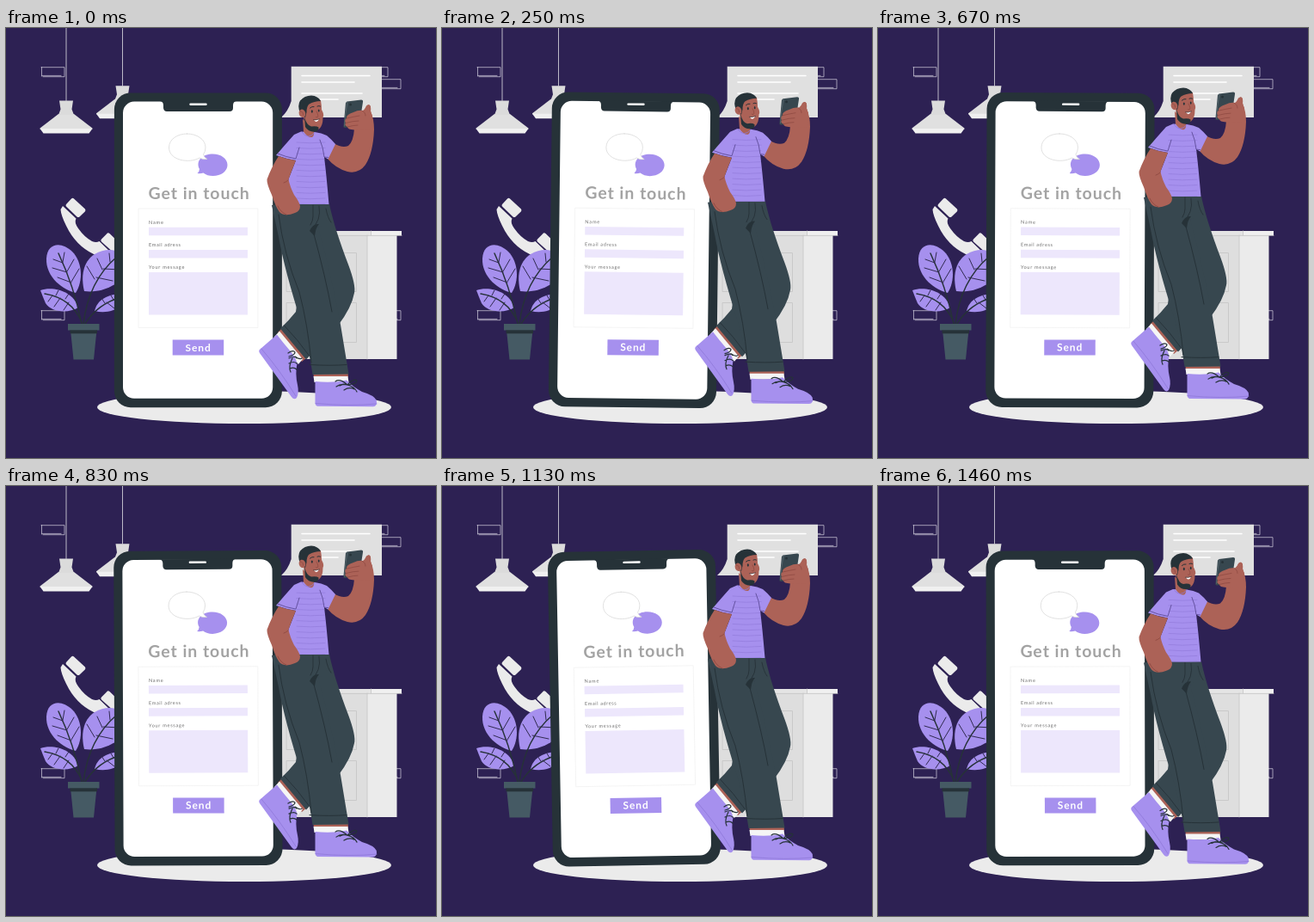
An HTML page with a canvas that plays this animation: 500x500 px, repeating every 1.5 s.

```html
<!DOCTYPE html>
<html lang="en">
<head>
<meta charset="utf-8">
<title>Get in touch</title>
<style>
  html, body { margin: 0; width: 100%; height: 100%; overflow: hidden; background: #2d2153; }
  canvas { display: block; width: 100vw; height: 100vh; }
</style>
</head>
<body>
<canvas></canvas>
<script>
const SIZE = 500, LOOP = 1500, STEPS = 36;
const BG = '#2d2153', PURPLE = '#a690ee', DARK = '#263238', CLOTH = '#37474f';
const SKIN = '#ac6257', SKIN_DARK = '#8c473f', PALE = '#ebebeb', GREY = '#e0e0e0';

const canvas = document.querySelector('canvas');
const ctx = canvas.getContext('2d');
const ratio = Math.max(1, window.devicePixelRatio || 1);
canvas.width = canvas.height = SIZE * ratio;

function fill(color, path) {
  ctx.fillStyle = color;
  ctx.fill(new Path2D(path));
}

function line(color, width, path) {
  ctx.strokeStyle = color;
  ctx.lineWidth = width;
  ctx.stroke(new Path2D(path));
}

function rect(color, x, y, w, h, radius = 0) {
  ctx.fillStyle = color;
  ctx.beginPath();
  ctx.roundRect(x, y, w, h, radius);
  ctx.fill();
}

function oval(color, x, y, rx, ry, angle = 0) {
  ctx.fillStyle = color;
  ctx.beginPath();
  ctx.ellipse(x, y, rx, ry, angle, 0, Math.PI * 2);
  ctx.fill();
}

function label(text, x, y, size, spacing, color, weight = 400) {
  ctx.font = `${weight} ${size}px Lato, sans-serif`;
  ctx.letterSpacing = spacing + 'px';
  ctx.fillStyle = color;
  ctx.fillText(text, x, y);
}

function brick(x, y, w) {
  line('#d5d1e0', 0.7, `M${x} ${y + 0.7}h${w}v11h${-w + 2}M${x + 0.5} ${y + 0.5}v10.500M${x + 1} ${y + 10.4}h${w - 5}`);
}

function lamp(x, y) {
  line('#bdbac8', 1, `M${x} 0V${y}`);
  fill(GREY, `M${x - 9} ${y + 15.5}h18l21.5 16.500v1h-61v-1z`);
  fill('#dbdbdb', `M${x - 8} ${y}h16l-1.500 10l2.500 6.500h-18l2.500 -6.500z`);
  fill('#f0f0f0', `M${x - 30.5} ${y + 32.5}h61l-4 5.500h-53z`);
}

function handset() {
  fill(PALE, 'M76 198.500Q77.500 197 79 198.500L92 210.500Q93 212 91.800 213.500L85.500 219.500Q84 220.500 82.500 219.500L70 207.500Q69 206 70 205z');
  fill(PALE, 'M117 239.500Q118.500 237.500 120.500 239L135 253L126 262L111 248.500Q109.500 247 111 245.500z');
  fill(PALE, 'M66 207L81.5 221.5Q79 226 84 233Q91 243 100 248Q105 250 108.5 248L124 263Q113 267 102 263Q81 253 70 230Q64 218 63.5 211Z');
}

function plant() {
  const leaves = [
    'M81 308C67 305 46 290 47 268C48 249 65 248 77 260C89 272 90 294 81 308z',
    'M91 306C87 290 89 272 103 263C120 253 139 258 140 277C139 296 113 309 91 306z',
    'M84 325C73 332 53 331 46 320Q43 313 40 305C55 300 78 306 84 325z',
    'M103 329C106 316 118 309 137 309C140 322 124 334 103 329z'
  ];
  leaves.forEach(leaf => fill(PURPLE, leaf));
  line(DARK, 1.5, 'M61 262Q79 300 88 344M129 266Q96 294 90 344M45 309Q76 314 88 342M134 313Q106 321 92 344');
  line('#302a50', 1, 'M66 273l-11 -4M71 284l-17 -5M76 296l-16 -6M66 272l2 -11M71 283l8 -14M76 295l9 -15'
    + 'M121 272l-1 -10M112 281l-6 -13M103 292l-9 -15M113 280l20 1M105 290l19 4'
    + 'M54 311l-5 7M63 314l-7 10M73 319l-6 9M58 311l3 -6M69 315l4 -6'
    + 'M125 316l-3 -5M115 320l-4 -6M117 319l9 7');
  rect('#455a64', 72, 344, 36.5, 7.5);
  fill('#455a64', 'M75 351h30.5l-3.5 34.5h-23.5z');
  rect(DARK, 74.5, 351.3, 31.5, 4);
}

function speechBoard() {
  fill(GREY, 'M331.700 44.700h105.300v59.300h-117Q328 97 331.700 85z');
  line('#fff', 1.6, 'M344 55.5h79M344 63h61M344 76h70M344 83h42');
}

function cabinet() {
  rect('#dedede', 316, 241, 104, 144);
  rect(PALE, 420, 241, 34.5, 144);
  rect('#e4e4e4', 310, 236, 114, 5);
  rect('#f0f0f0', 424, 236, 36, 5);
  line('#c4c4c4', 0.8, 'M312 241.4h148M424.5 236v5M420 241v144M326.500 261.5h81v45h-81zM326.500 319.5h81v46h-81z');
}

function backdrop() {
  ctx.fillStyle = BG;
  ctx.fillRect(0, 0, SIZE, SIZE);
  brick(41, 45, 27);
  brick(41, 328, 27);
  brick(412, 45, 32);
  brick(425, 59, 34);
  brick(430, 328, 29);
  lamp(70, 84.5);
  lamp(135.5, 67.2);
  speechBoard();
  cabinet();
  handset();
  plant();
  oval(PALE, 277, 441, 171, 19);
}

function bigPhone(angle) {
  ctx.save();
  ctx.translate(223.4, 258.3);
  ctx.rotate(angle * Math.PI / 180);
  ctx.translate(-223.4, -258.3);

  rect(DARK, 125.9, 75.4, 195, 365.8, 19);
  rect('#fff', 136, 85.6, 174.2, 345.2, 13);
  fill(DARK, 'M179 85Q183 85.500 183 90V93Q183.500 97 187 97H260Q264 97 264 93V90Q264 85.500 268 85z');
  line('#fff', 2.4, 'M214.5 88.7h18');

  fill(PURPLE, 'M240.5 146.500C250 146.500 257.500 152 257.500 159.200C257.500 166.500 250 172 240.500 172Q234 172 229.500 168.500Q226 169.500 222.500 169Q225 166.500 225 164C220 154 229 146.500 240.500 146.500z');
  const bubble = 'M210.5 123C222 123 232 129.500 232 139Q232 143.500 229.500 147Q230 150 234 152.500Q229 153.500 225 151C213 158 189.500 154 189.500 139C189.500 129.500 199 123 210.500 123z';
  fill('#fff', bubble);
  line('#d4d4d4', 0.7, bubble);

  label('Get in touch', 165.5, 199, 19.5, 0.95, '#a3a3a3', 700);
  line('#efefef', 0.7, 'M154.5 210h138.500v138.500h-138.500z');
  label('Name', 166, 227.8, 5.6, 0.8, '#6f6f6f');
  label('Email adress', 166, 254, 5.6, 0.6, '#6f6f6f');
  label('Your message', 166, 280.2, 5.6, 0.7, '#6f6f6f');
  rect('#ede7fc', 166, 231.7, 115, 9.5);
  rect('#ede7fc', 166, 258, 115, 9.5);
  rect('#ede7fc', 166, 284, 115, 49.5);
  rect(PURPLE, 193.7, 362.5, 59.5, 18);
  label('Send', 208.5, 375.5, 12, 0.9, '#fff', 700);
  ctx.restore();
}

function backLeg() {
  fill(SKIN, 'M321 349L350 383L344 388L316 354z');
  fill('#f5f5f5', 'M318 352.500L345 385L340 391L312 359z');
  fill(PURPLE, 'M315 356.500Q323 367 330 375Q337 383 338.500 390Q336 402 339 415Q341 424 338 430Q335 433 332 429L295 378Q293 375 296 373z');
  line('#8f78d8', 0.8, 'M297 373Q318 397 337 428');
  line(DARK, 1.2, 'M328 378q6 -4 8 -1q0 3 -7 5M329 384q7 -3 9 0M329 390q6 -3 9 0M330 396q5 -2 8 1M333 384q-5 10 -2 16M336 382q6 4 8 2');
  fill(CLOTH, 'M376 205C381 228 388 248 398 275Q407 299 405 308Q402 325 386 346L349 385.500L319 349.500Q329 340 337 330L345 270z');
  line(DARK, 0.9, 'M323.500 346Q339 362 352.500 381');
}

function frontLeg() {
  fill(SKIN, 'M357 400h40.500l.5 6h-40z');
  fill('#f5f5f5', 'M357.500 405h40l1 7h-40z');
  fill(PURPLE, 'M359.500 411Q380 413 396 409.500Q403 417 414 423Q428 427 430.800 433Q432 440 427 440.300L362 439.800Q359 439 359.500 433z');
  line('#8f78d8', 0.8, 'M360 436.500Q400 440 431 437');
  line(DARK, 1.2, 'M383 411q5 -4 14 4M388 416q7 -4 14 1M393 421q6 -4 12 -1M397 415q7 -8 11 -5q0 4 -11 5q-8 -2 -13 2M397 415q8 2 11 8');
  fill(CLOTH, 'M309 206Q340 202 376 205Q378 224 363 232L371 262Q383 312 389 345L398.500 402.500L356.500 403Q353 376 344 345Q324 282 317 243z');
  line(DARK, 1, 'M317 217Q323 263 341 307Q351 345 355 389M357 236Q372 291 379 330M353 391.500Q377 393 396 391.500');
  line(DARK, 0.9, 'M357 206V219Q357 224 354 229M364 207Q367 224 355 234M372 210Q374 221 378 226');
  fill(DARK, 'M353 236Q357 227 364 228Q360 232 359 242z');
}

function rightArm() {
  fill(SKIN, 'M381 134Q391 140 398 137Q404 132 405 117L400 110L416 97Q418 91 422 89Q425 91 424 97Q428 106 428 118Q427 145 418 159Q410 170 397 167Q383 163 373 151z');
  fill(CLOTH, 'M396.500 85.500L413 83.500Q415.500 83.500 415 86L411 112Q410 114 408 114.500L394 116Q392 116 392.500 113.500L395 87z');
  line('#607078', 0.7, 'M397 86Q394 100 393.500 114');
  oval(DARK, 400.5, 89, 1.5, 1.5);
  fill(SKIN, 'M404 98Q410 95 415 96Q418 94 419 90.500Q422 88 424 91Q423 96 426 102L424 119L405 118.500Q397 118 397 115Q393 113 395 110.500Q393 107 396 105Q395 101 404 98z');
  line(SKIN_DARK, 0.7, 'M396 105Q405 103 411 102M395 110.500Q404 108 410 108M397 115Q404 113 409 113M414 96Q418 98 418 102');
}

function torso() {
  const shirt = 'M343 120.500L359 121Q367 122 373 125Q379 130 383 135L374.500 152.500L370 150Q372.500 170 375.500 205H336.500Q330 188 328 177L337 154Q325 152 314 148Q326 134 335 124z';
  fill(PURPLE, shirt);
  ctx.save();
  ctx.clip(new Path2D(shirt));
  let stripes = '';
  for (let y = 133; y < 205; y += 6.5) stripes += `M338 ${y}Q353 ${y + 1.5} 371 ${y}`;
  line('#937cdc', 0.7, stripes);
  ctx.restore();
  line('#55438f', 0.8, 'M341 139L337 152Q325 150 316 146M365 130Q369 139 370 150L374.500 150.500');
  fill(SKIN, 'M317 149Q326 152.500 337 154Q332 166 328.500 176Q330 184 335 194Q341 202 342 207Q342 213 336 215Q324 220 318 214Q313 207 309 194Q303 181 303.500 176Q309 161 317 149z');
  line(SKIN_DARK, 0.8, 'M328 177Q326 179 323 180M316 207Q319 214 326 217');
}

function head() {
  fill(SKIN, 'M345 106L346 120.500Q351 128 356 127Q359 125 358 118z');
  line('#8f78d8', 0.8, 'M344 121Q351 131 359 121.500');
  fill(SKIN, 'M348 87Q359 81 366 84Q367 90 367 95Q370.500 101 368.500 104Q368.500 114 364 117.500Q355 122 348 114L345 98z');
  fill(DARK, 'M342 99Q338.500 90 342 84.500Q347 78.500 355 78.500Q363 79 366 85Q358 85 352.500 88.500Q349.500 91 349.500 98L348 104z');
  fill(DARK, 'M347 103Q349.500 113.500 355 114.500Q361 113.500 363.500 115.500Q364 119 360 120.500Q352 121.500 348 115z');
  oval(SKIN, 344.5, 99.3, 3.8, 4.8, -0.3);
  line(SKIN_DARK, 0.7, 'M342.500 97q3 0 3 4M361 97Q364 102 362 104L360.500 103.500');
  line(DARK, 1, 'M353.500 93q2 -2 4.500 -1.500M362 91q2 -1 3.500 0');
  oval(DARK, 355.8, 97, 1, 1.7);
  oval(DARK, 363.7, 96, 0.9, 1.6);
  fill('#fff', 'M358 107Q361 107.500 364 106Q362.500 109.500 360.500 109Q359 108.500 358 107z');
  line(DARK, 0.6, 'M357.500 106.800Q361 107.500 364.500 105.800');
}

function man(lift) {
  ctx.save();
  ctx.translate(0, -lift);
  backLeg();
  frontLeg();
  rightArm();
  torso();
  head();
  ctx.restore();
}

// Linear wave from 0 through 1 and -1 back to 0 over one loop.
const swing = p => p < 0.25 ? 4 * p : p < 0.75 ? 2 - 4 * p : 4 * p - 4;
const rise = p => 1 - Math.abs(1 - 2 * p);

function draw() {
  const time = performance.now() % LOOP;
  const p = Math.floor((time + 5) * STEPS / LOOP) % STEPS / STEPS;
  ctx.setTransform(ratio, 0, 0, ratio, 0, 0);
  ctx.lineCap = ctx.lineJoin = 'round';
  backdrop();
  bigPhone(swing(p));
  man(10 * rise(p));
  requestAnimationFrame(draw);
}
draw();
</script>
</body>
</html>
```
